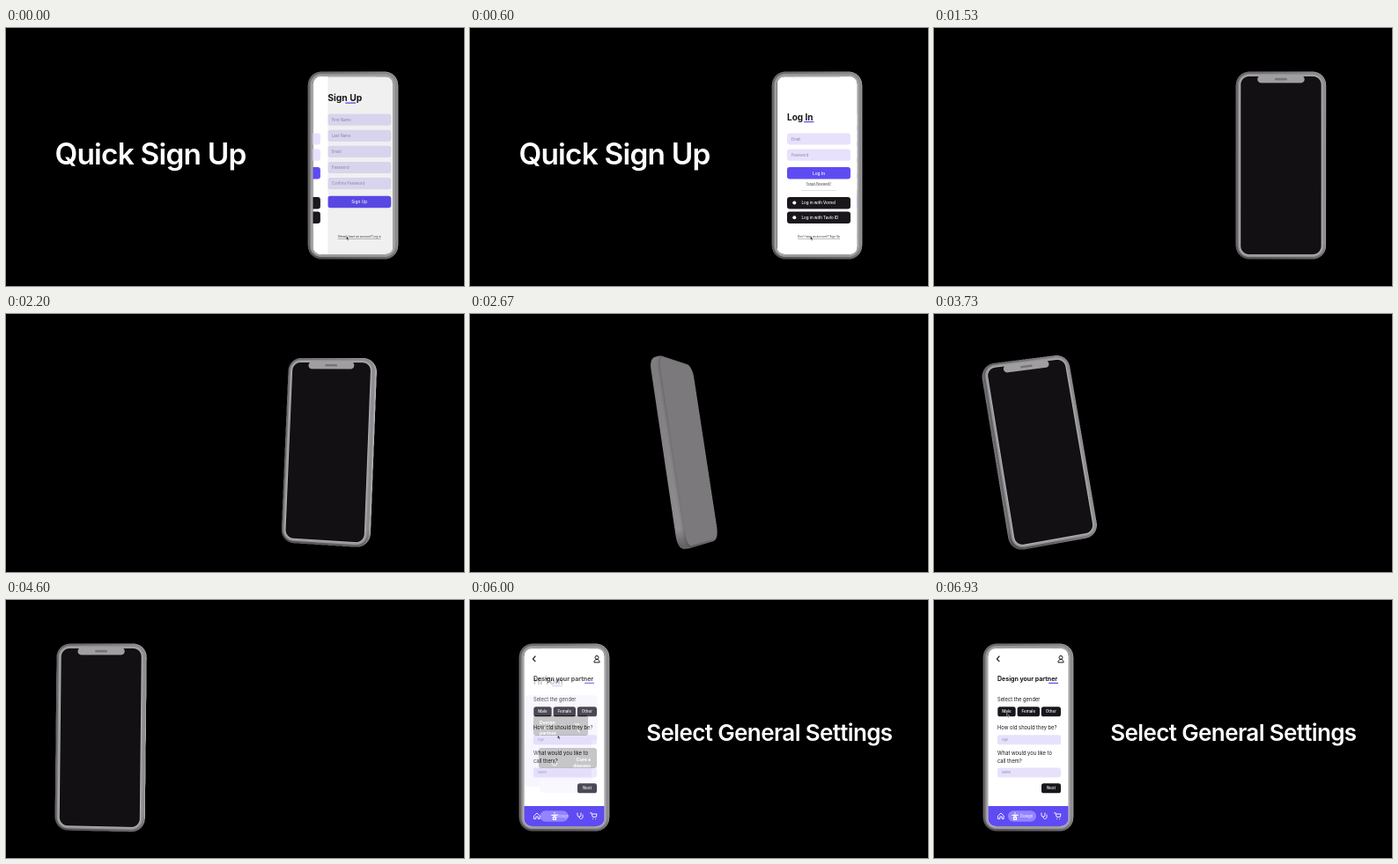
Animation, 520 px wide and 293 px high, one loop 6.99 s. Source, as an HTML page with a canvas:

```html
<!DOCTYPE html>
<html lang="en">
<head>
<meta charset="utf-8">
<title>Sign up walkthrough</title>
<style>
html, body { margin: 0; width: 100%; height: 100%; overflow: hidden; background: #000; }
canvas, svg { position: absolute; left: 0; top: 0; width: 100%; height: 100%; }
text { font-family: Inter, Roboto, sans-serif; }
.head { font-weight: 600; letter-spacing: -.024em; fill: #fff; text-anchor: middle; }
.b { font-weight: 700; }
.s { font-weight: 500; }
.m { text-anchor: middle; }
.e { text-anchor: end; }
.u { text-decoration: underline; }
.line { fill: none; stroke-linecap: round; stroke-linejoin: round; }
</style>
</head>
<body>
<canvas id="phone" width="1040" height="586"></canvas>
<svg id="stage" viewBox="0 0 520 293"></svg>
<script>
const LOOP = 6990, INK = '#19171c', VIOLET = '#5f4bf2', LILAC = '#e7e1fc', HINT = '#9189a8';
const $ = id => document.getElementById(id);
const clamp = v => Math.min(1, Math.max(0, v));
const ramp = (t, a, b) => clamp((t - a) / (b - a));
const out = (u, n) => 1 - (1 - u) ** n;
const smooth = u => u * u * (3 - 2 * u);

// ---- screen content ----
const box = (x, y, w, h, fill, r = 3) =>
  `<rect x="${x}" y="${y}" width="${w}" height="${h}" rx="${r}" fill="${fill}"/>`;
const txt = (x, y, size, s, fill = INK, cls = '') =>
  `<text x="${x}" y="${y}" font-size="${size}" fill="${fill}" class="${cls}">${s}</text>`;
const line = (d, color, w = 1) =>
  `<path class="line" d="${d}" stroke="${color}" stroke-width="${w}"/>`;
const field = (y, hint) => box(360, y, 72, 13.2, LILAC) + txt(364.5, y + 8.1, 4.3, hint, HINT);
const button = (y, s) => box(360, y, 72, 13.4, VIOLET) + txt(396, y + 8.5, 4.8, s, '#fff', 'm s');
const social = (y, s) => box(360, y, 72, 13.4, INK) +
  `<circle cx="368.3" cy="${y + 6.6}" r="2" fill="#fff"/>` + txt(376.5, y + 8.4, 4.5, s, '#fff', 's');
const page = x => box(x, 55, 92, 202.5, '#fff', 0);
const chip = (x, w, y, s) => box(x, y, w, 11, INK, 2.6) + txt(x + w / 2, y + 7.1, 4.5, s, '#fff', 'm s');
const answer = (y, s) => box(72, y, 72, 11, LILAC, 2.6) + txt(77, y + 6.8, 3.7, s, HINT);

const signUp = page(348.5) + txt(360, 83, 10.3, 'Sign Up', INK, 'b') + box(380, 84.6, 12, 1.2, VIOLET, .5) +
  ['First Name', 'Last Name', 'Email', 'Password', 'Confirm Password']
    .map((s, i) => field(97.6 + i * 18.1, s)).join('') +
  button(190.8, 'Sign Up') + txt(396, 238.3, 3.2, 'Already have an account? Log in', '#333', 'm u');

const logIn = page(348.5) + txt(360, 104.8, 10, 'Log In', INK, 'b') + box(379, 106, 11.5, 1.2, VIOLET, .5) +
  field(119.4, 'Email') + field(137.5, 'Password') + button(158, 'Log In') +
  txt(396, 177.6, 3.3, 'Forgot Password?', '#333', 'm u') + box(376, 184, 40, .6, '#ccc', 0) +
  social(192, 'Log in with Vornel') + social(208.6, 'Log in with Tavlo ID') +
  txt(396, 238.3, 3.2, 'Don’t have an account? Sign Up', '#333', 'm u');

const home = page(61) + txt(72, 95.5, 10, 'Hi Tom', INK, 'b') + box(93, 97, 12, 1.2, VIOLET, .5) +
  box(62, 108, 83, 52, '#e6dffb', 5) + box(62, 156, 76, 56, '#ded5fa', 5) +
  box(72, 131, 62, 23, INK) + box(78, 168, 66, 23, INK) + box(79, 205, 65, 14, LILAC) +
  ['Design', 'your', 'partner'].map((s, i) => txt(79, 140.5 + i * 6, 5.2, s, '#fff', 'b')).join('') +
  ['Cure a', 'disease'].map((s, i) => txt(137, 183 + i * 6.5, 5.2, s, '#fff', 'b e')).join('') +
  line('M119 141h5M121 145l3 5M95 181c-4 2-2 7 1 7s4-4 1-6', '#fff');

const design = page(61) + txt(72, 92.2, 7, 'Design your partner', INK, 'b') + box(130, 93.8, 11, 1.2, VIOLET, .5) +
  txt(72, 115, 5.8, 'Select the gender') +
  chip(72.3, 20.4, 121.3, 'Male') + chip(94.6, 25.4, 121.3, 'Female') + chip(121.8, 22.2, 121.3, 'Other') +
  txt(72, 147, 5.8, 'How old should they be?') + answer(153.3, 'Age') +
  txt(72, 176.3, 5.8, 'What would you like to') + txt(72, 184.6, 5.8, 'call them?') + answer(190.4, 'Name') +
  chip(122, 22, 208.3, 'Next');

const chrome = line('M74 64l-2.6 2.8 2.6 2.8', INK, 1.2) +
  line('M144 63.3a2 2 0 1 1 0 4a2 2 0 1 1 0-4M140.9 70.5c0-4.2 6.2-4.2 6.2 0z', INK) +
  box(61, 234, 92, 23.5, VIOLET, 0) +
  '<rect id="pill" y="239.3" width="32" height="12.4" rx="6.2" fill="#9384ff"/>' +
  line('M72.8 245l3.2-3 3.2 3v3.6h-2v-2.6h-2.4v2.6h-2z', '#fff', .9) +
  '<g id="figure">' + line('M92 241.6v.2M89 244.4h6M92 244v3M90.5 249.4v-3h3v3z', '#fff', 1.3) + '</g>' +
  '<g id="label">' + txt(98, 247.2, 4.4, 'Design', '#fff') + '</g>' +
  line('M122 242v2.2a2 2 0 0 0 4 0v-2.2M124 246.4c0 3 4 3 4 0v-1.4M128 244v.2', '#fff', .9) +
  line('M136.5 241.8h1.5l1.2 4.6h4l.8-3.4h-5.6M139.6 248.7v.1M142.6 248.7v.1', '#fff', .9);

$('stage').innerHTML = `
  <clipPath id="right"><rect x="348.5" y="55.3" width="91" height="201.7" rx="8.5"/></clipPath>
  <clipPath id="left"><rect x="61.5" y="55.3" width="91" height="201.7" rx="8.5"/></clipPath>
  <g id="auth" clip-path="url(#right)">
    <g id="signUp">${signUp}<rect id="dim" x="348" y="55" width="92" height="203"/></g>
    <g id="logIn">${logIn}</g>
    ${box(366, 55, 54, 1.2, '#c9c7cc', 0)}
  </g>
  <g id="app" clip-path="url(#left)">${home}<g id="design">${design}</g>${chrome}</g>
  <path id="cursor" d="M0 0v4.2l1-.9.8 1.6.8-.4-.8-1.5h1.3z" fill="#111" stroke="#fff" stroke-width=".4"/>
  <text id="title1" class="head" x="164" y="155" font-size="33.4">Quick Sign Up</text>
  <text id="title2" class="head" x="339.9" y="159.6" font-size="26">Select General Settings</text>`;

// ---- keyframes: time, then values, joined by a monotone cubic ----
const poses = [ // t, x, y, rx, ry, rz
  [1500, 394, 156, 0, 0, 0],
  [2200, 366.6, 155.8, 2, -13, 2.3],
  [2930, 179, 157, 5, -188, -13],
  [3070, 165, 156.2, 5, -226, -9.7],
  [3670, 122, 155.5, 4, -344, -9.7],
  [4200, 109, 155.8, 2, -367, -3],
  [4600, 107.5, 156, 0, -365, .6],
  [5130, 107, 156, 0, -360, 0]];
const pointer = [
  [640, 386.5, 236.5], [800, 388, 224], [1350, 402, 125],
  [5150, 118, 214], [5700, 99.5, 153.5], [6150, 99.5, 153.5], [6650, 83, 129], [6930, 82.5, 128.5]];

function sample(keys, t) {
  const last = keys.length - 1;
  if (t <= keys[0][0]) return keys[0].slice(1);
  if (t >= keys[last][0]) return keys[last].slice(1);
  const i = keys.findIndex(k => k[0] > t) - 1;
  const a = keys[i], b = keys[i + 1], span = b[0] - a[0], u = (t - a[0]) / span;
  const slope = (j, c) => j < 0 || j >= last ? 0 : (keys[j + 1][c] - keys[j][c]) / (keys[j + 1][0] - keys[j][0]);
  const tangent = (j, c) => {
    const p = slope(j - 1, c), q = slope(j, c);
    return p * q > 0 ? 2 * p * q / (p + q) : 0;
  };
  return a.slice(1).map((v, k) => {
    const c = k + 1, s = smooth(u);
    return v + (b[c] - v) * s + span * (tangent(i, c) * u * (1 - u) ** 2 - tangent(i + 1, c) * u * u * (1 - u));
  });
}

// ---- solid phone ----
const ctx = $('phone').getContext('2d');
ctx.scale(2, 2);
const W = 51, H = 106, DEPTH = 5.5, VIEW = 800;

function drawPhone(t) {
  const [cx, cy, ...deg] = sample(poses, t);
  const [rx, ry, rz] = deg.map(d => d * Math.PI / 180);
  const project = (x, y, z) => {
    const x1 = x * Math.cos(ry) + z * Math.sin(ry), z1 = z * Math.cos(ry) - x * Math.sin(ry);
    const y1 = y * Math.cos(rx) - z1 * Math.sin(rx), z2 = y * Math.sin(rx) + z1 * Math.cos(rx);
    const k = VIEW / (VIEW - z2);
    return [cx + k * (x1 * Math.cos(rz) - y1 * Math.sin(rz)), cy + k * (x1 * Math.sin(rz) + y1 * Math.cos(rz))];
  };
  const fill = (points, ...paints) => {
    ctx.beginPath();
    points.forEach(p => ctx.lineTo(...project(...p)));
    ctx.closePath();
    for (const paint of paints) {
      ctx.fillStyle = paint;
      ctx.fill();
    }
  };
  const plate = (z, x0, y0, x1, y1, r, ...paints) => {
    const points = [];
    [[x1 - r, y1 - r], [x0 + r, y1 - r], [x0 + r, y0 + r], [x1 - r, y0 + r]].forEach(([x, y], q) => {
      for (let k = 0; k <= 8; k++) {
        const a = (q + k / 8) * Math.PI / 2;
        points.push([x + r * Math.cos(a), y + r * Math.sin(a), z]);
      }
    });
    fill(points, ...paints);
  };
  const body = (z, inset, ...paints) => plate(z, inset - W, inset - H, W - inset, H - inset, 15 - inset, ...paints);
  const gradient = (x0, y0, x1, y1, from, to) => {
    const g = ctx.createLinearGradient(x0, y0, x1, y1);
    g.addColorStop(0, from);
    g.addColorStop(1, to);
    return g;
  };

  ctx.clearRect(0, 0, 520, 293);
  const facing = Math.cos(ry) > 0 ? 1 : -1;
  const metal = gradient(cx - 52, 0, cx + 52, 0, '#757376', '#b3b1b4');
  const floor = gradient(0, cy + 88, 0, cy + 106, '#0000', '#0005');
  for (let s = -1; s <= 1.001; s += .08) {
    const inset = 2.4 * (1 - Math.sqrt(Math.max(0, 1 - s ** 4)));
    const bevel = `rgba(70,68,72,${.45 * Math.max(0, s) ** 3})`;
    body(s * DEPTH * facing, inset, metal, floor, bevel);
  }
  if (Math.sin(ry) > .2)
    for (const [y, h] of [[-78, 8], [-62, 15], [-42, 15]])
      fill([[-W - .3, y, -1.6], [-W - .3, y, 1.6], [-W - .3, y + h, 1.6], [-W - .3, y + h, -1.6]], '#474548');
  if (facing < 0) return body(-DEPTH, 2.6, '#7b797c');
  body(DEPTH, 2.6, '#979598');
  body(DEPTH, 4.6, '#b7b5b8');
  body(DEPTH, 5.6, '#121013');
  plate(DEPTH, -26.5, -H + 4.8, 26.5, -H + 13, 4, '#a09ea1');
  plate(DEPTH, -7, -H + 7.6, 7, -H + 10, 1.2, '#757376');
}

const set = (id, name, value) => $(id).setAttribute(name, value);
const move = (id, x, y) => set(id, 'transform', `translate(${x} ${y})`);

function draw(t) {
  drawPhone(t);

  const slide = out(ramp(t, -30, 470), 3);
  move('logIn', -91 * (1 - slide), 0);
  move('signUp', 30 * slide, 0);
  set('dim', 'opacity', .06 + .1 * (slide - .17));
  set('auth', 'opacity', t < 1500 ? 1 : 0);

  const swap = out(ramp(t, 5800, 6200), 2);
  set('app', 'opacity', ramp(t, 5040, 5130));
  set('design', 'opacity', swap);
  set('pill', 'x', 66 + 18 * swap);
  move('figure', 16 * (1 - swap), 0);
  set('label', 'opacity', swap);

  move('cursor', ...sample(pointer, t));
  set('cursor', 'opacity', t < 1500 || t > 5130 ? 1 : 0);

  const leave = smooth(ramp(t, 1080, 1450)), enter = ramp(t, 5200, 5750);
  set('title1', 'opacity', 1 - leave);
  move('title1', 0, 4 * leave);
  set('title2', 'opacity', smooth(enter));
  move('title2', 0, 8 * (1 - ramp(t, 5200, 6700)) ** 3);
}

const start = performance.now();
(function frame() {
  draw((performance.now() - start) % LOOP);
  requestAnimationFrame(frame);
})();
</script>
</body>
</html>
```
